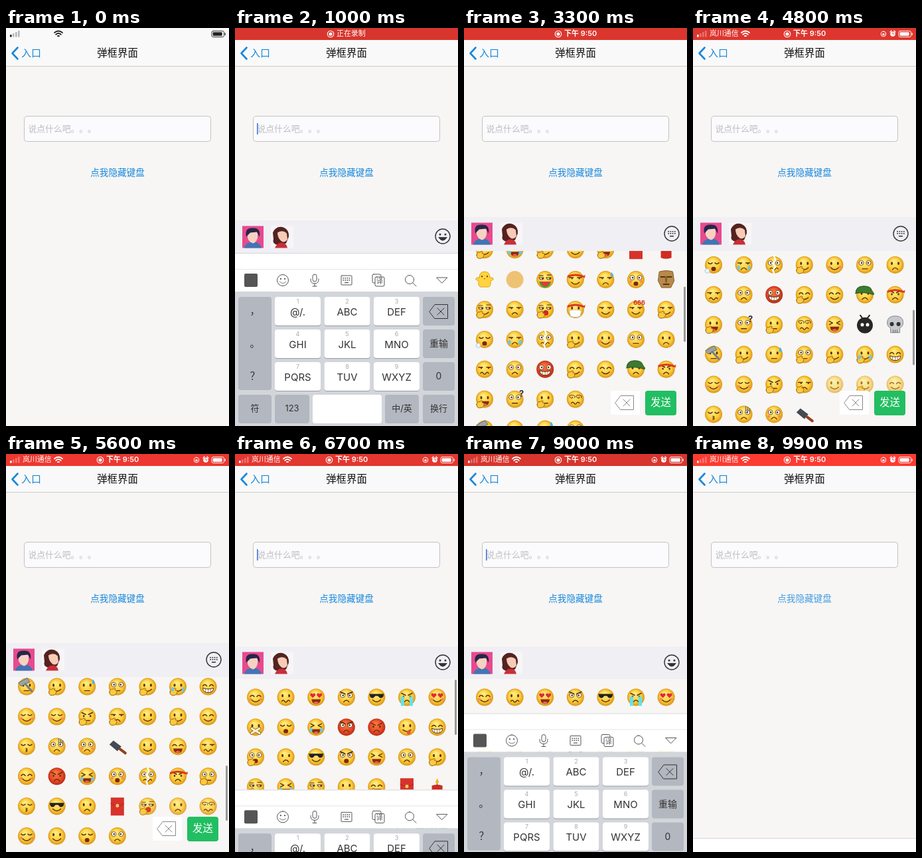
Animation, 336 px wide and 598 px high, one loop 10000 ms. Source, as an HTML page with a canvas:

```html
<!DOCTYPE html>
<html lang="zh-CN">
<head>
<meta charset="utf-8">
<title>弹框界面</title>
<style>
html, body { margin: 0; width: 100%; height: 100%; overflow: hidden; background: #f7f6f4 }
canvas { display: block }
</style>
</head>
<body>
<canvas id="stage" width="336" height="598"></canvas>
<script>
const ctx = document.getElementById('stage').getContext('2d');
const W = 336, H = 598, LOOP = 10000;
const INK = '#5a3208', BLUE = '#1787dd', DARK = '#333';
const KEYBOARD_H = 260, SLIDE = 350;
// Times at which the keyboard opens and closes.
const TYPING = [[600, 1500], [6558, 7821], [8750, 9611]];
const HIDE = 9611;
const SCROLL = [[2500, 0], [3300, 167], [3800, 200], [4300, 200], [4800, 279], [5300, 420], [5600, 420], [6300, 0]];

const clamp = v => Math.max(0, Math.min(1, v));
const ease = v => (v = clamp(v), v * v * (3 - 2 * v));
const slide = (t, start, dur = SLIDE) => ease((t - start) / dur);

function scrollAt(t) {
  let [t0, y0] = SCROLL[0];
  for (const [t1, y1] of SCROLL) {
    if (t < t1) return t <= t0 ? y0 : y0 + (y1 - y0) * (t - t0) / (t1 - t0);
    [t0, y0] = [t1, y1];
  }
  return y0;
}

function path(d, fill, stroke, width = 1) {
  const p = new Path2D(d);
  if (fill) { ctx.fillStyle = fill; ctx.fill(p); }
  if (stroke) { ctx.strokeStyle = stroke; ctx.lineWidth = width; ctx.stroke(p); }
}
function rect(x, y, w, h, fill) { ctx.fillStyle = fill; ctx.fillRect(x, y, w, h); }
function box(x, y, w, h, r, fill, stroke, width = 1) {
  ctx.beginPath(); ctx.roundRect(x, y, w, h, r);
  if (fill) { ctx.fillStyle = fill; ctx.fill(); }
  if (stroke) { ctx.strokeStyle = stroke; ctx.lineWidth = width; ctx.stroke(); }
}
const disc = (x, y, r, fill, stroke, width) => box(x - r, y - r, 2 * r, 2 * r, r, fill, stroke, width);
function text(s, x, y, size, color, align = 'center', weight = 400) {
  ctx.font = `${weight} ${size}px Inter, "Noto Sans CJK SC", "Noto Sans CJK", sans-serif`;
  ctx.textAlign = align; ctx.textBaseline = 'middle';
  ctx.fillStyle = color; ctx.fillText(s, x, y);
}
function at(x, y, draw) { ctx.save(); ctx.translate(x, y); draw(); ctx.restore(); }

// Each part is a list of layers: path, fill, stroke, stroke width.
const WIDE = [
  ['M-9-3a3.5 3.5 0 1 0 7 0a3.5 3.5 0 1 0-7 0M2-3a3.5 3.5 0 1 0 7 0a3.5 3.5 0 1 0-7 0', '#fff', INK, .8],
  ['M-5-3v.2M5-3v.2', 0, INK, 2.6]
];
const EYES = {
  d: [['M-5-3v1.6M5-3v1.6', 0, INK, 2.8]],
  c: [['M-8-1q3-4 6 0M2-1q3-4 6 0', 0, INK, 1.5]],
  u: [['M-8-3q3 3 6 0M2-3q3 3 6 0', 0, INK, 1.5]],
  h: [['M-5 1l-4-4q0-3 2-3t2 1.5q0-1.5 2-1.5t2 3zM5 1l-4-4q0-3 2-3t2 1.5q0-1.5 2-1.5t2 3z', '#e5263a']],
  w: WIDE,
  b: [...WIDE, ['M-9-8l7 3M9-8l-7 3', 0, INK, 1.8]],
  a: [['M-8-6l6 3M8-6l-6 3', 0, INK, 1.6], ['M-5-1v.5M5-1v.5', 0, INK, 2.6]],
  g: [['M-11-5h22l-1 4q-4 5-8-1h-4q-4 6-8 1z', '#222']],
  x: [['M-8-5l5 2.5-5 2.5M8-5l-5 2.5 5 2.5', 0, INK, 1.5]],
  s: [['M-9-3h7a3.5 3 0 0 1-7 0zM2-3h7a3.5 3 0 0 1-7 0z', '#fff', INK, 1], ['M-9-6h6M3-7h6', 0, INK, 1.1], ['M-3.5-2v.3M7.5-2v.3', 0, INK, 2.6]],
  l: [['M-9-3h6M3-3h6', 0, INK, 1.5], ['M-5-2v.4M6-2v.4', 0, INK, 2.2]],
  p: [['M-5-3q2-1 1 1t-4-1 3-3 4 4M5-3q2-1 1 1t-4-1 3-3 4 4', 0, INK, 1]]
};
const MOUTHS = {
  s: [['M-6 4q6 6 12 0', 0, INK, 1.4]],
  f: [['M-4 7q4-5 8 0', 0, INK, 1.4]],
  o: [['M-3.5 6a3.5 3.2 0 1 0 7 0a3.5 3.2 0 1 0-7 0', '#7c2810']],
  r: [['M-3 5a4 4 0 1 0 8 0a4 4 0 1 0-8 0', '#d3281d']],
  D: [['M-7 3h14q-1 7-7 7t-7-7z', '#8c2a12'], ['M-4 8q4-3 8 0q-4 3-8 0', '#ee6a5c']],
  l: [['M-4 6h8', 0, INK, 1.4]],
  w: [['M-6 6q2-3 4 0t4 0 4 0', 0, INK, 1.4]],
  t: [['M-6 4q6 5 12 0', 0, INK, 1.4], ['M0 6l5-1q2 6-2 6t-3-5', '#ea5046']],
  T: [['M-8 2q8 3 16 0q0 7-8 7t-8-7z', '#fff', INK, 1], ['M-4 3v5M0 3v6M4 3v5', 0, INK, .6]],
  k: [['M-1 3q4 1 0 2.5q4 1 0 2.5', 0, INK, 1.3]],
  n: []
};
const EXTRAS = {
  T: [['M-9-1h5v14h-5zM4-1h5v14h-5z', '#5ee3f2']],
  J: [['M-8 0q5 5 0 7t0-7M8 0q5 5 0 7t0-7', '#69c7ee']],
  H: [['M-12 8q1-5 4-4l4-2q2 1 0 3l3 1q1 6-5 7t-6-5z', '#ffc93c', '#9a640c', 1]],
  B: [['M-12-6q12-5 24 0v3q-12-5-24 0zM11-5l4-2-1 5z', '#dd3524']],
  S: [['M9-11q5 6 1 7t-1-7', '#4cb4ed']],
  C: [['M-8 3h.2M8 3h.2', 0, '#f98a58', 4]],
  W: [['M-9 3h18q-2 9-9 9t-9-9z', '#36a345'], ['M-7 3h14q-2 7-7 7t-7-7z', '#e53935']],
  M: [['M-9 2q9-3 18 0l-2 8q-7 3-14 0z', '#fff', '#b9c3c6', .8]],
  X: [['M-6 2L6 9M6 2L-6 9', 0, INK, 4.5], ['M-6 2L6 9M6 2L-6 9', 0, '#fff3d2', 3.2]],
  Z: [['M-13 9a3.5 3.5 0 1 0 7 0a3.5 3.5 0 1 0-7 0', '#eaf5fa', '#a6c3ce', .8]],
  I: [['M0-13l2 6-4 5 4 5-4 5 2 5', 0, '#fff', 2.4]],
  G: [['M-14-2q0-11 12-11t12 7q5 4 3 6-13-5-27-2z', '#3d7a32', '#28541f', 1]],
  V: [['M3-12v7M6-11v7M9-9v7', 0, '#51608a', 1]],
  m: [['M-12-6l13-7 4 6-13 6z', '#9ba3a7', '#626b6f', 1], ['M-2-4l10 11', 0, '#767d81', 3]]
};
const SPECIAL = {
  E: [['M-10-13h20v27h-20z', '#d7332c'], ['M-10-4q10 7 20 0', 0, '#a92520', 1], ['M0-1v.2', 0, '#f5cc58', 5]],
  L: [['M-8-2q8-3 16 0v14q-8 3-16 0z', '#cf2b22'], ['M0-3v-3', 0, INK, 1], ['M0-13q5 7 0 8t0-8', '#ffb32c']],
  c: [['M-8-3q0-9 8-9t8 9q6-1 5 3l-4 2q1 8-3 9h-12q-4-1-3-9l-4-2q-1-4 5-3z', '#ffd43e', '#e0a51c', 1],
      ['M-4-5v.5M4-5v.5', 0, INK, 2], ['M-2-2h4l-2 2z', '#ec7a22']],
  o: [['M-13 0a13 13 0 1 0 26 0a13 13 0 1 0-26 0', '#eec274']],
  m: [['M-10-12q10-3 20 0l2 14-5 10h-14l-5-10z', '#b98949', '#805a2b', 1], ['M-8-4h6M2-4h6M-4 7h8', 0, '#50351a', 2], ['M0-4v7', 0, '#80602f', 3]],
  b: [['M-12 1a12 12 0 1 0 24 0a12 12 0 1 0-24 0', '#262626'], ['M-4 0v.2M4 0v.2', 0, '#fff', 5], ['M-4-10l-3-4M4-10l3-4', 0, '#262626', 2]],
  k: [['M-12-3q0-10 12-10t12 10q0 6-5 8v7h-14v-7q-5-2-5-8z', '#c6cace', '#84898e', 1],
      ['M-5-1v.2M5-1v.2', 0, '#333', 6], ['M-3 8v4M0 8v4M3 8v4', 0, '#666', 1]],
  n: [['M-12-3l6-6 12 9-6 7z', '#444b52'], ['M4 4l8 6', 0, '#94401f', 4]]
};
const FACES = (
  'csC dw hD bf gs afT hsC ' +
  'dnX uo xDJ bfR afR dt cT ' +
  'woH df gs bo xD wf dsH ' +
  'ssH xDJ ssH ds cDH !E !L ' +
  '!c !o sDW lsB lfS woC !m ' +
  'ssH lf srH dnMB ls ls6 lsH ' +
  'uoZ lfJ wwI dsH dsC wl df ' +
  'lw wf wTR csH cs dfG afB ' +
  'dDH wlQ dlH pw xD !b !k ' +
  'dlm dsH dlS wlH dsH dsHJ cT ' +
  'usC usC alH lfH ds dsH cs ' +
  'uk wfV wfC !n ds cD lw').split(' ');
const ROWS = 18;

const layers = list => list.forEach(l => path(...l));

function face(code) {
  if (code[0] === '!') return layers(SPECIAL[code[1]]);
  const [eyes, mouth, ...extras] = code;
  const g = ctx.createRadialGradient(-2, -5, 2, 0, 0, 13);
  const tones = extras.includes('R') ? ['#f8743c', '#e84a28', '#b92a17'] : ['#ffea7c', '#fbca38', '#db9417'];
  tones.forEach((c, i) => g.addColorStop([0, .65, 1][i], c));
  disc(0, 0, 13, g);
  layers(EYES[eyes]);
  layers(MOUTHS[mouth]);
  for (const e of extras) if (EXTRAS[e]) layers(EXTRAS[e]);
  if (extras.includes('6')) text('666', 5, -10, 9, '#d42c22', 'center', 700);
  if (extras.includes('Q')) text('?', 10, -8, 13, '#333', 'center', 700);
}

function emojiList(scroll, top) {
  ctx.save();
  ctx.beginPath(); ctx.rect(0, top, W, H); ctx.clip();
  for (let i = 0; i < ROWS * 7; i++) {
    const col = i % 7, row = Math.floor(i / 7), y = 365.5 + row * 44.9 - scroll;
    if (y < top - 16 || y > H + 16) continue;
    // Faces fade out where they would sit under the buttons.
    ctx.globalAlpha = col > 3 ? clamp((551 - y) / 25) : 1;
    const code = FACES[i < FACES.length ? i : (i * 11) % FACES.length];
    if (ctx.globalAlpha > 0) at(31 + col * 45.6, y, () => face(code));
  }
  ctx.restore();
}

function deleteIcon(x, y, color) {
  at(x, y, () => path('M-14 0L-6-10.5H13.5V10.5H-6zM-2-5L8 5M8-5L-2 5', 0, color, 1));
}

function keyIcon(x, y, r, color) {
  disc(x, y, r, 0, color, 1.4);
  for (let i = 0; i < 8; i++) rect(x - 5.7 + i % 4 * 3.2, y - 4 + (i >> 2) * 3, 1.7, 1.6, color);
  rect(x - 3, y + 3, 6, 1.5, color);
}

function smileIcon(x, y, r, color, width = 1.4) {
  disc(x, y, r, 0, color, width);
  disc(x - r * .36, y - r * .25, r * .13, color);
  disc(x + r * .36, y - r * .25, r * .13, color);
  at(x, y, () => {
    ctx.scale(r / 11, r / 11);
    path(width > 1 ? 'M-6 2q6 8.5 12 0z' : 'M-6 3q6 6 12 0', width > 1 ? DARK : 0, color, 1);
  });
}

function avatars(y) {
  at(11, y, () => {
    rect(0, 0, 32, 33, '#e84a8e');
    path('M3 33q2-9 13-9t13 9z', '#3f75b5');
    path('M8 10q8-6 15 0v8q-2 7-7 8-6-2-8-8z', '#f7d2c2');
    path('M6 16Q3 3 15 3q13-1 11 13l-4-7-10 1z', '#28264a');
  });
  at(54, y, () => {
    rect(0, 0, 34, 33, '#f7f5f7');
    path('M3 10Q8-1 19 2q9 4 8 14l-4 10-12 3Q1 26 4 20z', '#54231f');
    path('M10 10q8-5 14 1l1 9q-4 6-9 3-6-5-6-13z', '#f6cbb8');
    path('M6 33q4-9 11-8t8 8z', '#c92e37');
  });
}

function panel(t, typing, offset) {
  at(0, offset, () => {
    const top = typing ? 289 : 284, bottom = typing ? 338 : 335;
    const scroll = scrollAt(t);
    rect(0, top, W, H, '#f7f6f4');
    emojiList(scroll, bottom);
    rect(0, top, W, bottom - top, '#f0eff4');
    avatars(top + 8.5);
    if (typing) smileIcon(313, 313, 11, DARK); else keyIcon(313, 309, 11, DARK);
    box(221, 545, 44, 36, 3, '#fff');
    deleteIcon(242, 563, '#888');
    box(273, 545, 47, 37, 4, '#22be62');
    text('发送', 296.5, 563, 15.5, '#fff');
    if (t >= 2500 && t < 6900) box(331, bottom + 1 + scroll * .314, 3, 83, 1.5, '#99999b');
  });
}

function toolbar() {
  const c = '#555', y = 41;
  box(14, y - 10, 20, 20, 2, c);
  smileIcon(72, y, 8.5, c, 1);
  at(120, y, () => path('M-3-6a3 3 0 0 1 6 0v5a3 3 0 0 1-6 0zM-6-2v1q0 6 6 6t6-6v-1M0 5v4M-3 9h6', 0, c));
  box(160, y - 7, 16, 14, 1, 0, c);
  for (let i = 0; i < 8; i++) rect(162.5 + i % 4 * 3, y - 4 + (i >> 2) * 3, 1.6, 1.6, c);
  rect(165, y + 3, 6, 1.2, c);
  box(207, y - 9, 13, 13, 2, 0, c);
  box(211, y - 5, 14, 14, 2, '#fff', c);
  text('译', 218, y + 2, 10, c);
  disc(263, y - 1, 6.5, 0, c);
  path(`M268 ${y + 4}l5 5`, 0, c);
  path(`M304 ${y - 4}h16l-8 8z`, 0, c);
}

const KEYS = ['@/.', 'ABC', 'DEF', 'GHI', 'JKL', 'MNO', 'PQRS', 'TUV', 'WXYZ'];
function keyboard(top) {
  at(0, top, () => {
    rect(0, 0, W, 58, '#fff');
    rect(0, 0, W, 1, '#d5d5d8');
    rect(0, 24, W, 1, '#e6e6e8');
    toolbar();
    rect(0, 58, W, 210, '#d2d5da');
    const grey = '#b3b7bf';
    box(5, 66, 50, 140, 4, grey);
    ['，', '。', '？'].forEach((s, i) => text(s, 30, 87 + i * 49, 15, DARK));
    KEYS.forEach((s, i) => {
      const x = 60 + i % 3 * 74.5, y = 66 + Math.floor(i / 3) * 49;
      box(x, y + 1, 69, 43, 4, '#999ca2');
      box(x, y, 69, 43, 4, '#fff');
      text(i + 1, x + 34.5, y + 7, 9, '#aaa');
      text(s, x + 34.5, y + 23, 15, DARK);
    });
    ['', '重输', '0'].forEach((s, i) => {
      box(283, 66 + i * 49, 48, 43, 4, grey);
      text(s, 307, 88 + i * 49, 14, DARK);
    });
    deleteIcon(307, 88, DARK);
    [['符', 5, 50, grey], ['123', 60, 52, grey], ['', 117, 104, '#fff'], ['中/英', 226, 51, grey], ['换行', 283, 48, grey]]
      .forEach(([s, x, w, fill]) => { box(x, 213, w, 43, 4, fill); text(s, x + w / 2, 234, 13, DARK); });
  });
}

function statusBar(t) {
  const red = t >= 500, fg = red ? '#fff' : '#222';
  if (red) {
    const glow = .5 + .5 * Math.cos(2 * Math.PI * (t - 80) / 2000);
    rect(0, 0, W, 18, `rgb(${214 + 41 * glow},${53 + 6 * glow},${45 + 5 * glow})`);
    const naming = t < 2800;
    disc(naming ? 144 : 142, 9, 4.8, 0, fg, 1.1);
    disc(naming ? 144 : 142, 9, 2.6, fg);
    if (naming) text('正在录制', 153, 9, 10.9, fg, 'left', 500);
    else text('下午 9:50', 151, 9, 11, fg, 'left', 600);
    if (t < 3700) return;
    text('岚川通信', 25, 9, 10.9, fg, 'left');
    disc(287, 9, 3.8, 0, fg);
    rect(285.5, 8, 3, 3, fg);
    disc(301, 9, 3.8, fg);
    path('M297 6l2-2M305 6l-2-2', 0, fg, 1.3);
    path('M301 6.5V9h2', 0, '#e2382f', .9);
  }
  for (let i = 0; i < 4; i++) {
    ctx.globalAlpha = i ? .3 : 1;
    box(6 + i * 4, 10 - i * 2, 2.6, 3.5 + i * 2, .6, fg);
  }
  ctx.globalAlpha = 1;
  at(79, 13, () => path('M-6-6q6-5 12 0M-3.8-3.3q3.8-3.2 7.6 0M-1-1h2', 0, fg, 1.9));
  box(310, 4.5, 18.5, 9, 2.2, 0, fg, .9);
  box(311.7, 6.2, 14, 5.6, 1, fg);
  rect(329.6, 7.3, 1.2, 3.5, fg);
}

function page(t, typing) {
  rect(0, 0, W, H, '#f7f6f4');
  rect(0, 0, W, 57, '#f9f9f9');
  rect(0, 57, W, 1, '#cbcbcb');
  path('M17.5 29.5L9.5 38l8 8.5', 0, BLUE, 2.6);
  text('入口', 23, 38, 15, BLUE, 'left');
  text('弹框界面', 168, 38, 15.4, '#111', 'center', 500);
  box(27.5, 132.5, 281, 38, 4, '#fbfafc', '#c3c3c3');
  // Character by character, so that the full stops keep their full width.
  [...'说点什么吧。。。'].forEach((c, i) => text(c, 33.5 + i * 12.8, 152, 12.8, '#bdbdc1', 'left'));
  if (typing && (t - typing[0]) % 1000 < 550) rect(33, 143, 1.6, 17, '#3f76d8');
  ctx.globalAlpha = t > HIDE ? .8 : 1;
  text('点我隐藏键盘', 168, 218, 13.6, BLUE);
  ctx.globalAlpha = 1;
  statusBar(t);
}

function draw(t) {
  ctx.lineCap = ctx.lineJoin = 'round';
  const typing = TYPING.find(([a, b]) => t >= a && t < b);
  const raised = TYPING.reduce((sum, [a, b]) => sum + slide(t, a) - slide(t, b), 0);
  page(t, typing);
  const offset = 314 * (1 - slide(t, TYPING[0][0]) + slide(t, HIDE, 200));
  if (offset < 314) panel(t, typing, offset);
  if (raised > .001) keyboard(H - KEYBOARD_H * raised);
}

const start = performance.now();
let last = -1;
function tick() {
  const t = Math.floor((performance.now() - start) % LOOP / 100) * 100;
  if (t !== last) draw(last = t);
  requestAnimationFrame(tick);
}
tick();
</script>
</body>
</html>
```
